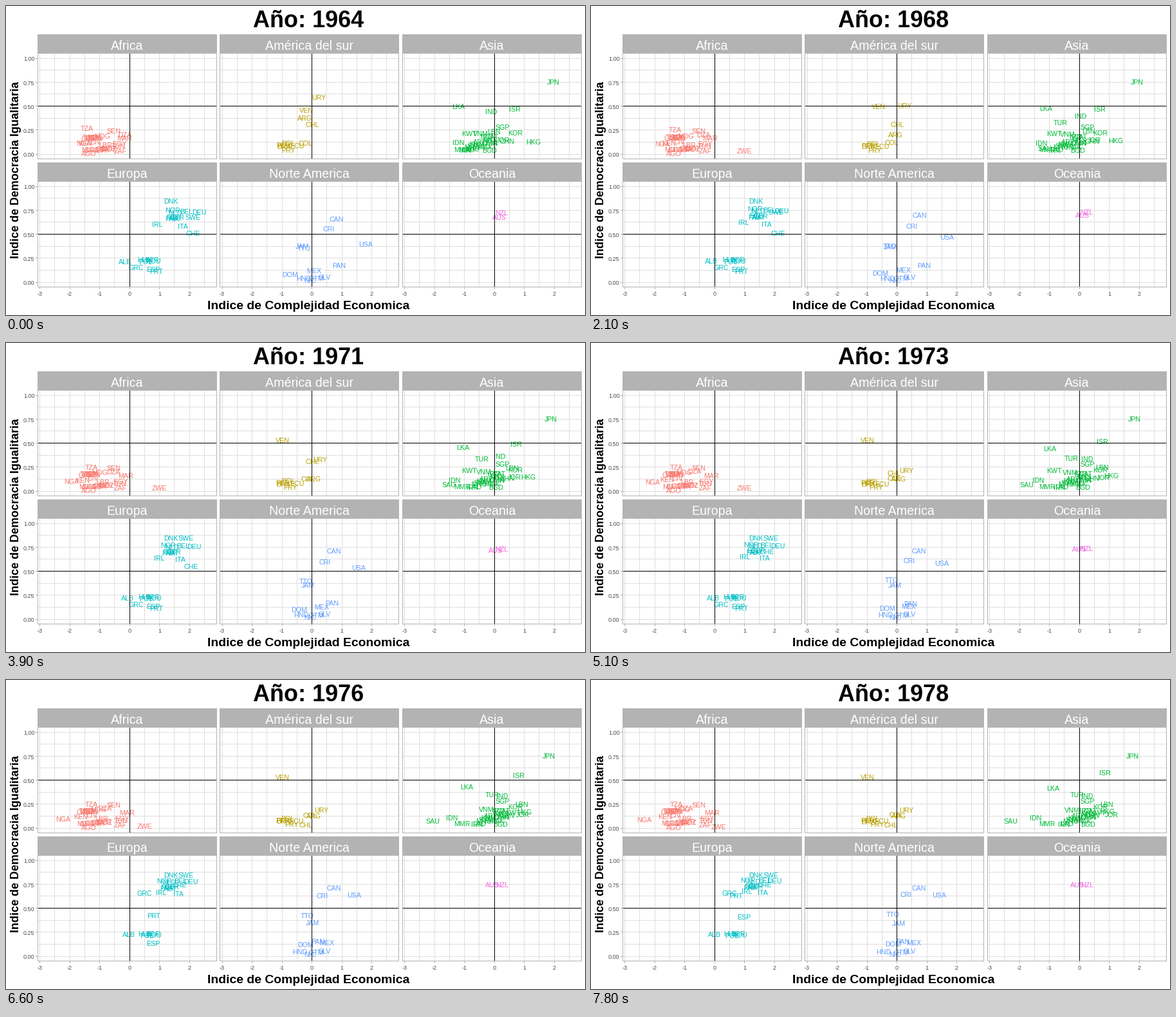
A matplotlib script that plays this animation: 900 by 480 pixels, repeating every 8 s.

```python
import matplotlib.pyplot as plt
import numpy as np
from matplotlib.animation import FuncAnimation
from matplotlib.patches import Rectangle

W, H, DPI = 900, 480, 100
PX = 72 / DPI
STEP_MS, TICK_MS, LOOP_MS = 300, 100, 8000
LAST_STEP = 26
YEARS_PER_STEP = 53 / 99
GREY, GRID, TICK_TEXT = "#B3B3B3", "#DEDEDE", "#4D4D4D"
UNIT_X, UNIT_Y = 46.5, 149
COL_GAP, ROW_GAP = 283.5, 199
WHOLE = (0, LAST_STEP)

rng = np.random.default_rng(12)
plt.rcParams["font.family"] = "Liberation Sans"
fig = plt.figure(figsize=(W / DPI, H / DPI), dpi=DPI, facecolor="white")
ax = fig.add_axes([0, 0, 1, 1])
ax.set_xlim(0, W)
ax.set_ylim(H, 0)
ax.axis("off")


def label(x, y, text, size, color="black", ha="center", **kw):
    kw.setdefault("va", "baseline")
    return ax.text(x, y, text, fontsize=size * PX, color=color, ha=ha, **kw)


def fill(x, y, w, h, color, z=1):
    """Fill whole pixels, with the corner rounded down to the pixel grid."""
    ax.add_patch(Rectangle((int(x), int(y)), w, h, fc=color, lw=0, zorder=z))


def draw_panel(title, col, row):
    left, right = int(49 + COL_GAP * col), int(327 + COL_GAP * col)
    top, bottom = 73 + ROW_GAP * row, 237 + ROW_GAP * row
    zero_x, mid_y = 192 + COL_GAP * col, 155.5 + ROW_GAP * row
    width, height = right - left + 1, bottom - top + 1
    for i in range(-6, 6):
        x = zero_x + i * UNIT_X / 2
        fill(x, top, 1, height, GRID)
        if row == 1 and i % 2 == 0:
            fill(x, bottom, 1, 4, GREY)
            label(x, 450.5, str(i // 2), 9, TICK_TEXT)
    for i in range(9):
        y = mid_y + (0.5 - i / 8) * UNIT_Y
        fill(left, y, width, 1, GRID)
        if col == 0 and i % 2 == 0:
            fill(left - 3, y, 3, 1, GREY)
            label(44.5, y + 4.3, f"{i / 8:.2f}", 9, TICK_TEXT, "right")
    fill(left, mid_y, width, 1, "black", 5)
    fill(zero_x, top, 1, height, "black", 5)
    for x in (left, right):
        fill(x, top, 1, height, GREY, 6)
    fill(left, bottom, width, 1, GREY, 6)
    fill(left, top - 29, width, 30, GREY, 6)
    label((left + right + 1) / 2, top - 5, title, 19.7, "white", zorder=7)


class Region:
    """A panel whose country codes drift from one point to another."""

    def __init__(self, title, color, col, row):
        self.color, self.tracks = color, []
        draw_panel(title, col, row)

    def add(self, code, start, end=None, span=WHOLE, first=0, offset=(0, 0)):
        ends = np.array([start, end or start]) + offset
        text = label(0, 0, code, 10.6, self.color, zorder=4)
        self.tracks.append((text, ends, span, first))
        return self

    def cluster(self, codes, start, end, spread):
        for code in codes.split():
            self.add(code, start, end, offset=rng.uniform(-1, 1, 2) * spread)
        return self

    def update(self, step):
        for text, (start, end), span, first in self.tracks:
            x, y = start + (end - start) * np.interp(step, span, (0, 1))
            text.set_position((x, y + 4))
            text.set_visible(step >= first)


africa = Region("Africa", "#F8766D", 0, 0)
africa.cluster("GHA TGO ZMB MDG CMR KEN GAB CIV COG UGA ETH MOZ MLI GIN SDN LBR",
               (143, 212), (135, 211), (20, 13))
africa.cluster("MAR EGY TUN", (181, 210), (185, 211), (6, 8))
africa.add("DZA", (185, 200), (148, 199))
africa.add("TZA", (126, 190), (133, 193), (0, 10))
africa.add("NGA", (121, 213), (83, 217))
africa.add("SEN", (167, 194)).add("AGO", (129, 229)).add("ZAF", (178, 225))
africa.add("ZWE", (238, 225), (198, 228), (17, 26), first=2)

south = Region("América del sur", "#B79F00", 1, 0)
south.cluster("PER BOL BRA ECU", (441, 215), (440, 217), (14, 5))
south.add("VEN", (467, 162), (430, 151), (0, 13))
south.add("URY", (486, 142), (490, 202), (4, 18))
south.add("ARG", (464, 174), (478, 211), (0, 10))
south.add("CHL", (476, 184), (466, 225), (13, 22))
south.add("COL", (465, 213), (474, 209)).add("PRY", (439, 224), (445, 224))

asia = Region("Asia", "#00BA38", 2, 0)
asia.cluster("PHL KHM MYS IRN THA PAK QAT OMN SYR ARE LAO IRQ MNG BGD",
             (730, 213), (751, 213), (28, 12))
asia.add("JPN", (851, 118), (842, 118)).add("LKA", (703, 156), (718, 168))
asia.add("IND", (754, 164), (771, 180), (0, 17))
asia.add("ISR", (791, 160), (799, 144), (10, 26))
asia.add("LBN", (758, 195), (801, 193), (0, 20))
asia.add("TUR", (724, 182), (756, 178), (4, 22), first=2)
asia.add("KWT", (720, 198), (788, 206), (17, 22))
asia.add("SAU", (725, 222), (652, 219))
asia.add("JOR", (772, 208), (809, 209)).add("HKG", (820, 211), (803, 204))
asia.add("VNM", (738, 198), (748, 202)).add("IDN", (703, 212), (691, 214))
asia.add("SGP", (772, 188)).add("KOR", (792, 197)).add("CHN", (779, 210))
asia.add("MMR", (709, 223))

europe = Region("Europa", "#00BFC4", 0, 1)
europe.cluster("AUT BEL NLD FIN GBR FRA", (273, 325), (263, 317), (18, 7))
europe.cluster("ROU BGR POL HUN", (224, 394), (226, 394), (12, 3))
europe.add("DNK", (256, 303)).add("ALB", (185, 397), (192, 395))
europe.add("NOR", (259, 317), (244, 311)).add("DEU", (300, 320), (285, 312))
europe.add("SWE", (291, 328), (280, 303), (4, 13))
europe.add("IRL", (235, 339), (242, 328)).add("ITA", (275, 342), (267, 330))
europe.add("CHE", (291, 353), (270, 318), (12, 18))
europe.add("GRC", (202, 406), (215, 331), (18, 22))
europe.add("PRT", (234, 412), (226, 335), (19, 24))
europe.add("ESP", (229, 409), (238, 368), (22, 26))

north = Region("Norte America", "#619CFF", 1, 1)
north.add("CAN", (514, 331), (510, 323), (0, 10))
north.add("CRI", (502, 346), (490, 333)).add("USA", (559, 370), (541, 334), (0, 22))
north.add("JAM", (460, 373), (479, 378)).add("TTO", (463, 376), (469, 364))
north.add("PAN", (518, 403), (485, 406), (8, 22)).add("MEX", (479, 411), (502, 408))
north.add("DOM", (442, 417), (470, 410)).add("SLV", (495, 421))
north.add("HND", (463, 423), (455, 422))
north.add("GTM", (482, 423)).add("NIC", (472, 426))

oceania = Region("Oceania", "#F564E3", 2, 1)
oceania.add("NZL", (770, 321), (771, 318))
oceania.add("AUS", (767, 328), (756, 318), (0, 22))

regions = [africa, south, asia, europe, north, oceania]
heading = label(470.5, 33.2, "", 36, weight="bold")
label(470.5, 471, "Indice de Complejidad Economica", 19.4, weight="bold")
label(15.5, 255, "Indice de Democracia Igualitaria", 17.9, weight="bold",
      rotation=90, va="center")


def update(frame):
    step = frame * TICK_MS // STEP_MS
    heading.set_text(f"Año: {1964 + round(step * YEARS_PER_STEP)}")
    for region in regions:
        region.update(step)
    return []


anim = FuncAnimation(fig, update, frames=LOOP_MS // TICK_MS, interval=TICK_MS,
                     repeat=True, repeat_delay=0, blit=False)
plt.show()
```
